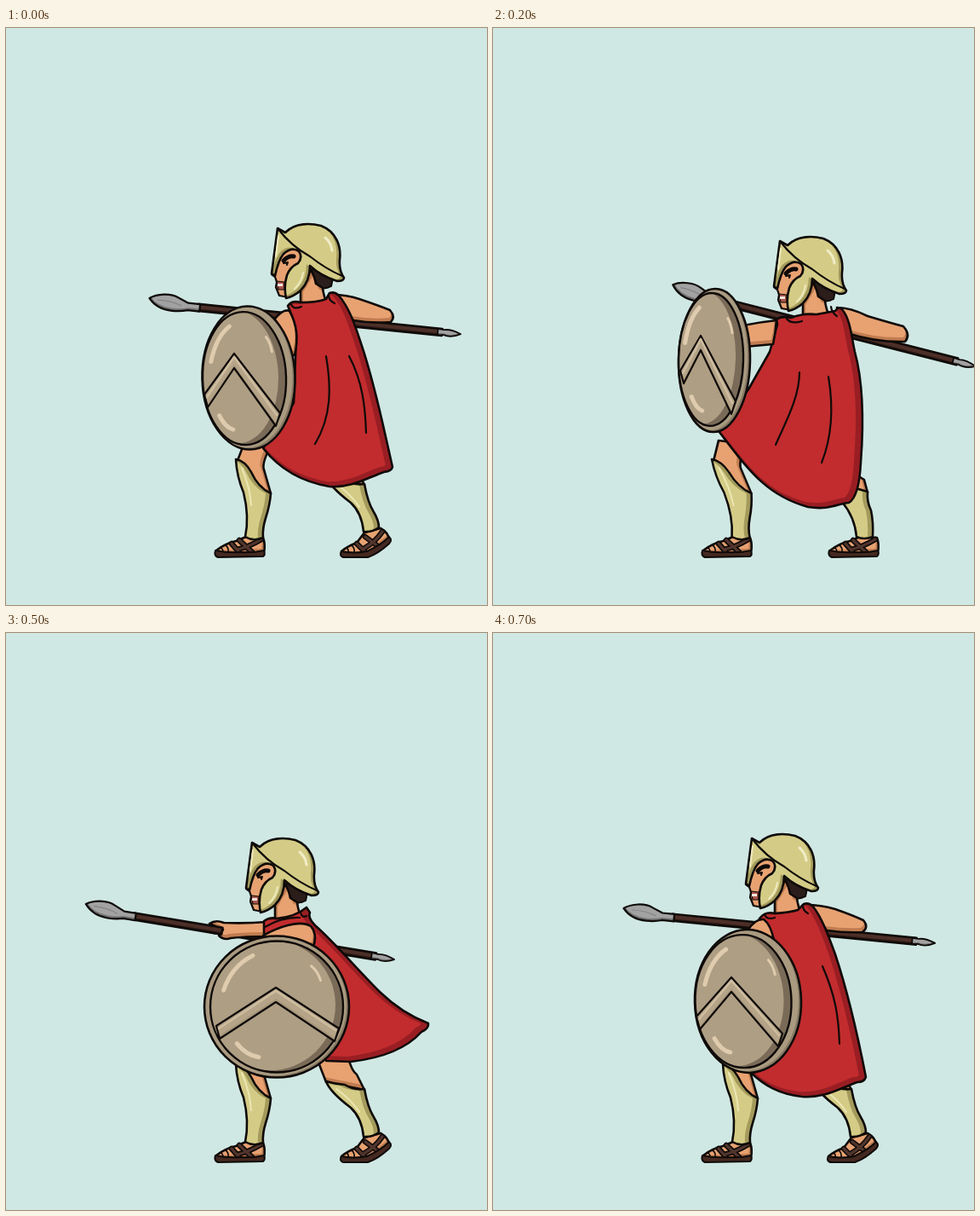
An HTML page that plays this animation: 565x677 px, repeating every 800 ms.

```html
<!DOCTYPE html>
<html lang="en">
<head>
<meta charset="utf-8">
<title>Hoplite thrust</title>
<style>
html, body { margin: 0; width: 100%; height: 100%; overflow: hidden; background: #d0e8e4; }
svg { display: block; width: 100%; height: 100%; stroke-linejoin: round; stroke-linecap: round; }
.pose { opacity: 0; animation: show 800ms step-end infinite; animation-delay: calc((var(--i) - 8) * 100ms); }
@keyframes show {
  0% { opacity: 1; }
  12.5%, 100% { opacity: 0; }
}
</style>
</head>
<body>
<svg id="stage" viewBox="0 0 565 677"></svg>
<script>
const INK = '#0e0a08', SKIN = ['#e8a272', '#c07c50'], BRASS = ['#d4cc86', '#a39a5c'],
      RED = ['#c22c2e', '#991e23'], WOOD = ['#4d2f27', '#2f1b16'], STEEL = ['#a2a2a2', '#737373'];
let clips = 0;

const group = (t, body) => `<g transform="${t}">${body}</g>`;
const fill = (d, color, w = 0, ink = INK) => `<path d="${d}" fill="${color}" stroke="${ink}" stroke-width="${w}"/>`;
const line = (d, color = INK, w = 2.2) => `<path d="${d}" fill="none" stroke="${color}" stroke-width="${w}"/>`;

// Outlined shape with a strip of shade on the side away from (dx, dy)
function tone(d, [base, dark], dx = -4, dy = -3, w = 2.6, edge = 0) {
  const id = 'c' + clips++;
  return `<clipPath id="${id}"><path d="${d}"/></clipPath><g clip-path="url(#${id})">` +
    fill(d, dark) + group(`translate(${dx} ${dy})`, fill(d, base, edge, dark)) + '</g>' + line(d, INK, w);
}

const ellipse = (cx, cy, rx, ry) =>
  `M${cx - rx} ${cy}a${rx} ${ry} 0 1 1 ${2 * rx} 0a${rx} ${ry} 0 1 1 ${-2 * rx} 0Z`;

function spear([x, y, angle]) {
  return group(`translate(${x} ${y}) rotate(${angle})`,
    tone('M58 -4H346V4H58Z', WOOD, 0, -2.5) +
    tone('M0 -5C8 -11 24 -14 34 -9L46 -4L60 -4V4.5H46Q38 7 28 7Q10 7 0 -5Z', STEEL, 0, -3, 2.2) +
    line('M10 -4Q26 -5 38 0', '#848484', 1.2) +
    tone('M341 -3.5L348 -3Q356 -5 368 0Q357 6 348 3L341 3.5Z', STEEL, 0, -2, 1.8));
}

const grip = ([x, y, angle], from, to) =>
  group(`translate(${x} ${y}) rotate(${angle})`, tone(`M${from} -4H${to}V4H${from}`, WOOD, 0, -2.5));

const strap = d => line(d, INK, 6.5) + line(d, '#51352c', 3.2);

const flatFoot =
  tone('M247 613Q257 605 270 602L282 597L302 598Q305 606 303 615L247 617Z', SKIN, -3, -4) +
  line('M252 610Q255 611 255 615M258 607Q262 610 261 615', INK, 1.6) +
  strap('M265 605L273 614M274 601L289 615M300 600Q285 609 271 612') +
  fill('M246 613Q260 616 275 615Q290 616 303 613Q305 618 302 620L249 621Q244 619 246 613Z', '#452920', 2);

const raisedFoot =
  tone('M394 614Q401 608 412 604L421 592L440 587Q449 592 450 600L425 619L395 619Z', SKIN, -3, -4) +
  line('M400 610Q403 612 402 616M406 607Q410 610 409 616', INK, 1.6) +
  strap('M412 605L421 614M422 597L437 608M442 591Q434 603 420 611') +
  fill('M394 614Q409 617 424 614Q440 607 450 597Q454 601 450 605Q437 617 425 621L396 621Q391 619 394 614Z', '#452920', 2);

// The front leg leans by a skew around the ankle
function frontLeg(lean) {
  return flatFoot + group(`matrix(1 0 ${-lean / 94} 1 ${lean * 600 / 94} 0)`,
    tone('M271 510L281 484L312 488Q300 511 303 518L311 546L296 545Z', SKIN) +
    tone('M270 506Q281 508 288 521Q296 539 311 546Q310 560 305 575Q301 588 302 598Q291 603 281 597Q286 573 279 545Q271 526 270 506Z', BRASS, -6, 0) +
    line('M277 516Q287 540 288 560', '#ebe6b4', 2));
}

const shin =
  tone('M376 527L364 496L402 498Q406 514 412 518L421 536Z', SKIN, -3, -6) +
  tone('M376 526Q386 529 398 530Q409 537 421 535Q425 557 432 568Q438 578 438 586Q430 592 420 591Q418 569 405 557Q380 538 376 526Z', BRASS, -6, 1) +
  line('M388 535Q406 548 415 562', '#ebe6b4', 2);

const rear = {
  raised: raisedFoot + shin,
  low: group('translate(148 0) rotate(-6 250 620)', flatFoot) + group('translate(6 4)', shin),
  flat: group('translate(149 0)', flatFoot) +
    tone('M410 555L420 520L436 530L440 545Z', SKIN) +
    tone('M410 556L426 540L440 544Q439 556 444 566Q447 580 446 597Q436 601 427 597Q425 574 410 556Z', BRASS, -6, 0)
};

const head =
  fill('M358 283Q375 284 384 293L382 303Q373 308 366 303Z', '#2b1e1a', 2) +
  tone('M346 325V304L358 284Q362 290 364 300L372 305Q373 315 378 325Z', SKIN, 3, 6) +
  fill('M320 261L312 289L316 292L318 298L317 304L321 314L332 316L346 274V259Z', SKIN[0], 2.2) +
  fill('M318 297L327 298L327 307L320 307Z', '#a9544a', 1.2) +
  fill('M319 300H325V303H319Z', '#f3e6e0') +
  line('M326 273Q332 267 338 268', INK, 5) + line('M326 276L331 275L330 278', INK, 2) +
  tone('M319 235L328 240C340 228 358 229 370 232C388 239 394 256 392 272Q391 285 397 293Q397 297 389 297Q370 291 357 279Q357 297 346 308Q338 315 329 317Q326 303 330 290Q334 280 343 276Q349 269 344 262Q336 256 326 265Q320 272 316 291L312 288Z', BRASS, -4, -2) +
  line('M319 235Q335 256 357 268Q376 283 395 291', INK, 2.2) +
  line('M320 244L317 268M349 287Q347 299 339 306', '#eeeabf', 2) +
  line('M375 246Q382 252 383 261', '#f0ecc6', 3);

function shield({ rim: [cx, cy, rx, ry, rot], face: [fx, fy, frx, fry], mark: [ax, ay, lx, ly, ex, ey] }) {
  const at = (u, v) => `${fx + u * frx} ${fy + v * fry}`;
  const glint = (a, b, c, w) => line(`M${at(...a)}Q${at(...b)} ${at(...c)}`, '#dfcbad', w);
  return group(`rotate(${rot} ${cx} ${cy})`,
      tone(ellipse(cx, cy, rx, ry), ['#a99a80', '#887a64'], -3, -2) +
      tone(ellipse(fx, fy, frx, fry), ['#ae9e84', '#7a6b58'], -9, -2, 2.4)) +
    tone(`M${ax} ${ay}L${ex} ${ey}L${ex - 5} ${ey + 15}L${ax} ${ay + 17}L${lx + 4} ${ly + 15}L${lx} ${ly}Z`,
      ['#b5a488', '#a8977b'], 0, -4, 2.2) +
    line(`M${lx + 3} ${ly + 3}L${ax} ${ay + 4}L${ex - 4} ${ey + 2}`, '#cfbda0', 2.5) +
    glint([-.8, -.25], [-.68, -.62], [-.36, -.78], 5) +
    glint([.52, -.62], [.62, -.54], [.66, -.4], 3) +
    glint([-.6, .56], [-.46, .74], [-.27, .77], 5);
}

function draw(p, i) {
  const skins = list => (list || []).map(d => tone(d, SKIN, -2, -5)).join('');
  return `<g class="pose" style="--i:${i}">` +
    spear(p.spear) + skins(p.back) + (p.grip ? grip(p.spear, ...p.grip) : '') +
    rear[p.rear] + frontLeg(p.lean) +
    group(`translate(${p.head})`, head) +
    tone(p.cape, RED, -4, -2, 2.6, 8) + (p.folds || []).map(d => line(d)).join('') +
    skins(p.front) + (p.collar ? tone(p.collar, RED, -3, -4) : '') + (p.crease ? line(p.crease) : '') +
    shield(p) + '</g>';
}

// Blends two poses, including the numbers inside their paths
function mix(a, b, t) {
  if (typeof a === 'number') return a + (b - a) * t;
  if (Array.isArray(a)) return a.map((v, i) => mix(v, b[i], t));
  if (typeof a === 'object') return Object.fromEntries(Object.keys(a).map(k => [k, mix(a[k], b[k], t)]));
  const num = /-?\d+(\.\d+)?/g, to = b.match(num);
  let i = 0;
  return a.replace(num, v => mix(+v, +to[i++], t));
}

const ready = {
  head: [0, 0], spear: [168, 322, 5.8], lean: 0, rear: 'raised',
  back: ['M384 313Q400 313 415 318Q436 325 451 331Q458 339 452 345Q430 347 408 343Z'],
  cape: 'M331 326Q336 319 346 322Q366 322 376 318L380 311Q386 309 391 314C404 329 411 352 417 370C434 420 444 472 454 515Q453 520 444 521C424 528 405 540 380 538C345 532 320 516 302 493L338 440L341 360L334 333Z',
  folds: ['M376 385C382 420 383 455 363 488', 'M403 385C419 415 422 445 423 475', 'M335 324Q337 331 347 327', 'M379 313Q379 320 386 323'],
  front: ['M316 341Q326 329 333 332Q346 355 339 384L322 384Z'],
  rim: [285, 410.5, 54.5, 84, -1.5], face: [280, 411, 49, 78], mark: [268, 382, 233, 430, 322, 452]
};

const drawn = {
  head: [18, 15], spear: [210, 306, 14.3], lean: -13, rear: 'flat',
  back: ['M404 328Q420 328 440 338Q463 345 482 350Q491 360 484 368Q450 369 416 358Z'],
  cape: 'M333 342Q340 337 350 340Q366 334 380 336L402 332Q406 326 410 330C420 342 421 362 425 380C436 420 435 470 432 510Q430 550 418 557C405 558 395 566 370 562C320 548 300 518 265 473L300 424L325 380L334 348Z',
  folds: ['M360 404C360 432 345 460 332 489', 'M394 409C400 445 398 480 386 510', 'M345 341Q350 348 363 344', 'M397 327Q398 334 404 338'],
  front: ['M294 349Q314 345 333 343Q332 357 329 371L296 374Z'],
  rim: [260, 390, 42, 84, 1], face: [256, 389, 38, 78], mark: [244, 361, 220, 402, 285, 438]
};

const lunge = {
  head: [-30, 11], spear: [93, 323, 9.4], grip: [150, 163], lean: -6, rear: 'low',
  back: ['M239 341Q246 336 256 340Q282 341 306 339V356Q282 356 264 358Q256 361 250 355L255 348Z'],
  cape: 'M303 338Q310 333 318 335Q340 333 353 322L357 328Q354 334 363 343C385 362 410 392 440 422Q465 446 496 458Q497 464 488 468C470 488 440 499 405 503L376 502L340 420L303 352Z',
  folds: ['M304 345Q325 333 345 334', 'M346 327Q347 335 353 332'],
  front: ['M302 355C320 345 345 336 358 344Q366 353 361 368L318 372Z'],
  rim: [318, 438.5, 85, 83, 0], face: [318, 438.5, 78, 77], mark: [317, 416, 247, 461, 391, 464]
};

const strike = {
  head: [-53, 11], spear: [5, 313, 9.2], grip: [150, 166], lean: 0, rear: 'raised',
  back: ['M153 334Q162 326 178 330Q230 333 290 330V350Q240 348 192 343Q178 350 168 345L170 339Z'],
  cape: 'M330 330Q365 350 400 385Q450 424 511 424Q516 429 510 437Q493 468 458 482L420 492L350 420Z',
  front: ['M281 349L310 338L352 350L372 370L330 400L285 405Q275 380 281 349Z'],
  collar: 'M281 341Q288 334 300 334Q320 332 331 322L336 328Q335 334 345 340Q360 350 377 357L350 358Q340 343 322 342Q300 342 281 350Z',
  crease: 'M311 355Q311 364 317 369',
  rim: [354.5, 438, 84, 83.5, 0], face: [355, 438, 77, 77], mark: [354, 414, 285, 460, 427, 460]
};

const settle = {
  head: [-15, 6], spear: [153, 328, 5.6], lean: 0, rear: 'raised',
  back: ['M368 319Q385 319 402 324Q422 331 435 337Q442 345 434 351Q414 352 392 349Z'],
  cape: 'M313 335Q320 326 331 329Q348 328 358 325L365 318Q371 316 376 321C387 335 395 358 402 377C418 425 428 470 438 521Q436 527 428 527C408 534 390 546 363 544C335 541 318 530 303 516L340 440L330 360L318 340Z',
  folds: ['M387 391C402 425 406 450 407 482', 'M319 330Q321 337 331 334', 'M364 319Q364 326 370 329'],
  front: ['M299 349Q308 335 318 336Q326 342 330 360L310 366Z'],
  rim: [299.5, 432, 62.5, 84, -1.5], face: [294, 432, 56.5, 78], mark: [280, 404, 239, 450, 340, 470]
};

const recover = {
  ...settle,
  head: [-23, 9], spear: [143, 329, 6.6],
  back: ['M359 323Q376 323 393 328Q413 335 426 341Q433 349 425 355Q405 356 383 353Z'],
  cape: 'M305 338Q312 329 323 332Q340 331 350 328L357 321Q363 319 368 324C381 340 390 362 399 382C419 425 435 465 449 507Q448 514 440 516C420 528 395 542 370 541C340 538 322 530 306 518L340 440L326 364L310 344Z',
  folds: ['M394 401C408 430 413 450 415 478', 'M311 333Q313 340 323 337', 'M356 322Q356 329 362 332'],
  front: ['M295 353Q304 338 315 340Q331 347 338 366L310 370Z'],
  rim: [307, 435, 71, 84, -1], face: [303, 435, 65, 78], mark: [293, 409, 240, 455, 356, 472]
};

const recoil = { ...lunge, lean: 0, rear: 'raised' };
const poses = [ready, mix(ready, drawn, .5), drawn, lunge, strike, recoil, recover, settle];
document.getElementById('stage').innerHTML = poses.map(draw).join('');
</script>
</body>
</html>
```
